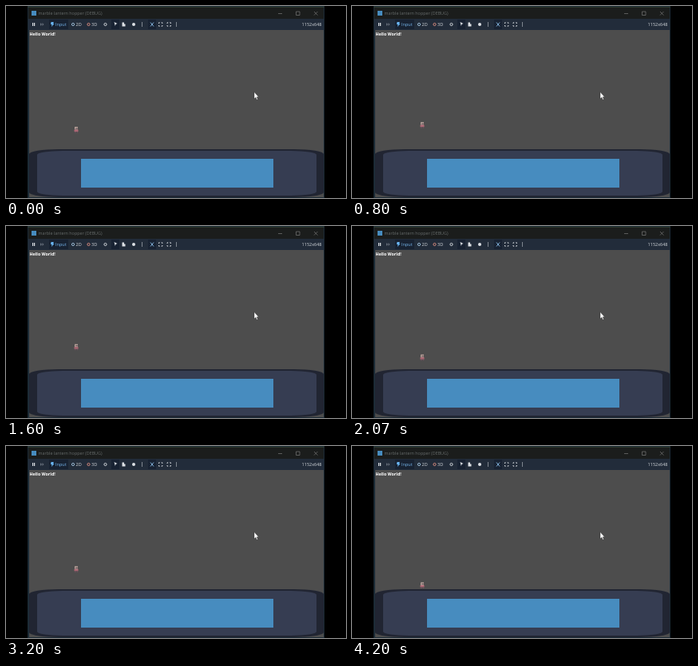
Write an HTML page that moves like this. It is 426 px wide and 240 px high and loops after 4270 ms.

```html
<!DOCTYPE html>
<html lang="en">
<head>
<meta charset="utf-8">
<title>Jumping player</title>
<style>
  html, body { margin: 0; width: 100%; height: 100%; overflow: hidden; background: #000; }
  svg { display: block; width: 100%; height: 100%; }
  text { font-family: "Open Sans", "Noto Sans", sans-serif; font-size: 5.5px; fill: #d4d8dc; }
</style>
</head>
<body>
<svg viewBox="0 0 426 240">
  <!-- window frame and title bar -->
  <rect x="27" width="372" height="240" fill="#1c2b36"/>
  <rect x="28" y="2" width="370" height="14" fill="#1b1d1c"/>
  <rect x="27" y="1" width="372" height="1" fill="#2b382c"/>
  <rect x="32" y="6" width="6" height="6" fill="#478cbf"/>
  <text x="40.5" y="11" style="font-size:5.4px;fill:#666b6b">marble lantern hopper (DEBUG)</text>
  <path d="M341 9.500h5M363.500 7h4.500v4.500h-4.500zM386 7l4.500 4.500m0-4.500l-4.500 4.500" fill="none" stroke="#777" stroke-width=".7"/>

  <!-- toolbar -->
  <rect x="28" y="16" width="370" height="14" fill="#222c3a"/>
  <g fill="#182232">
    <rect x="54" y="17" width="24" height="12"/>
    <rect x="132" y="17" width="10" height="12"/>
    <rect x="178" y="17" width="10" height="12"/>
  </g>
  <g fill="#dce0e4">
    <path d="M33 21h1.200v4h-1.200zM35 21h1.200v4h-1.200z"/>
    <path d="M43 21l2 2-2 2zM45.500 21l2 2-2 2z" fill="#68717c"/>
    <path d="M56.500 20h3.500l-1 2h1.500l-3.500 4 .5-3h-1.500z" fill="#69b5f2"/>
    <path d="M135.500 20l4 2-2 .7-.7 2.300z"/>
    <path d="M145.500 20.500h2.500v2h1.500v3h-4z"/>
    <circle cx="160" cy="23" r="2"/>
  </g>
  <g fill="none" stroke="#dce0e4" stroke-width=".9">
    <circle cx="84" cy="23" r="1.600" stroke="#a4c4df"/>
    <circle cx="103.500" cy="23" r="1.600" stroke="#e09082"/>
    <circle cx="124.500" cy="23" r="1.600"/>
    <path d="M181 20.500l4 5m0-5l-4 5" stroke="#8fc3ee"/>
    <path id="corners" d="M191.500 22v-1.200h1.200m2 0h1.200v1.200m0 2v1.200h-1.200m-2 0h-1.200v-1.200"/>
    <use href="#corners" x="10.500"/>
    <path id="dots" d="M170.500 20.500v1m0 1v1m0 1v1" stroke-width="1"/>
    <use href="#dots" x="43"/>
  </g>
  <text x="62" y="25" style="fill:#77b8ee">Input</text>
  <text x="87.500" y="25">2D</text>
  <text x="107" y="25">3D</text>
  <text x="395.500" y="25" text-anchor="end">1152x648</text>

  <!-- game view -->
  <rect x="29" y="30" width="369" height="209" fill="#4d4d4d"/>
  <text x="29.500" y="37" style="font-size:5.3px;font-weight:700;fill:#fff">Hello World!</text>
  <rect x="29" y="179" width="369" height="60" rx="37" ry="6" fill="#212532"/>
  <rect x="39" y="181" width="350" height="56" rx="32" ry="5" fill="#363d52"/>
  <rect x="94" y="191" width="241" height="36" fill="#478cbf"/>

  <g id="player">
    <rect x="-2" y="-4" width="4" height="3.500" fill="#b9a39b"/>
    <rect x="-1" y="-2.500" width="3" height="1" fill="#594b50"/>
    <rect x="-2.500" y="-.5" width="5" height="2.500" fill="#ad6875"/>
    <rect x="-2" y="2" width="1.500" height="1.500" fill="#71515e"/>
    <rect x=".7" y="2" width="1.500" height="1.500" fill="#71515e"/>
  </g>

  <path d="M311 107.500v8.500l1.900-1.700 1.300 2.900 1.300-.6-1.300-2.800h2.400z" fill="#fff" stroke="#222" stroke-width=".4"/>
</svg>
<script>
  const LOOP = 4.27, FLOOR = 174.5, SPAWN = 155, SCALE = 370 / 1152;
  const GRAVITY = 980 * SCALE, JUMP = 400 * SCALE, AIR_TIME = 2 * JUMP / GRAVITY;
  const DROP_AT = 0.115;
  const jumps = [0.467, 1.34, 2.17, 2.988];
  const player = document.getElementById("player");

  function height(t) {
    const start = jumps.findLast(s => s <= t);
    if (start === undefined) {
      const fall = Math.max(0, t - DROP_AT);
      return Math.min(FLOOR, SPAWN + GRAVITY * fall * fall / 2);
    }
    const air = Math.min(t - start, AIR_TIME);
    return FLOOR - JUMP * air + GRAVITY * air * air / 2;
  }

  const begin = performance.now();
  function draw() {
    const t = (performance.now() - begin) / 1000 % LOOP;
    player.setAttribute("transform", `translate(88 ${height(t).toFixed(2)})`);
    requestAnimationFrame(draw);
  }
  draw();
</script>
</body>
</html>
```
